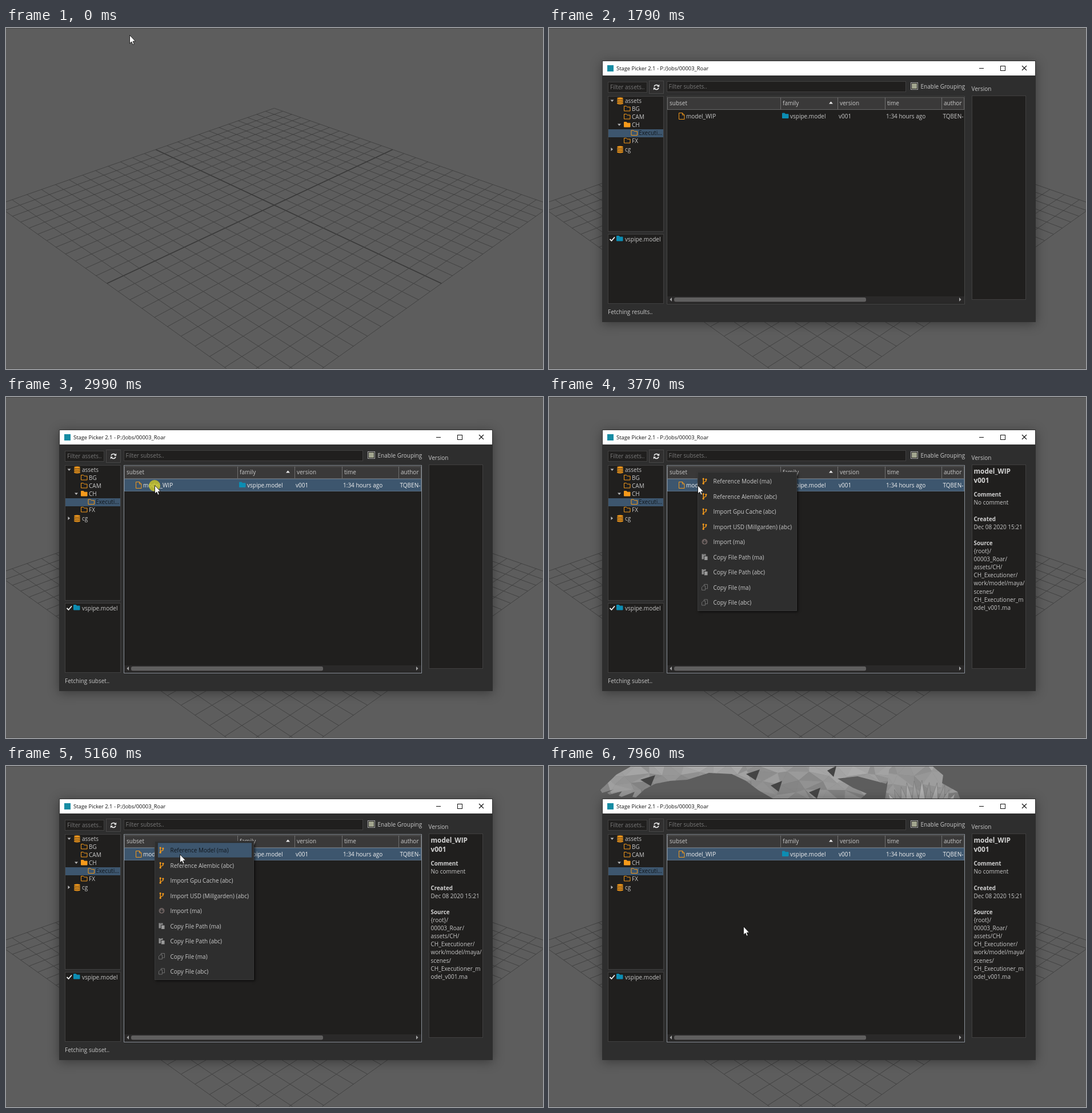
Recreate the animation shown at these times as an HTML page with a canvas. Size 940 px wide and 596 px high, loop 8 s.

```html
<!DOCTYPE html>
<html lang="en">
<head>
<meta charset="utf-8">
<title>Loading a model</title>
<style>
html, body { margin: 0; width: 100%; height: 100%; overflow: hidden; background: #5d5d5d; }
canvas { display: block; width: 940px; height: 596px; }
</style>
</head>
<body>
<canvas id="stage" width="940" height="596"></canvas>
<script>
const ctx = document.getElementById('stage').getContext('2d');
const LOOP = 8000;
const ORANGE = '#f59a1b', BLUE = '#0c8db3', SELECT = '#3d566e';
const TEXT = '#c8c8c8', DARK = '#201f1e', EDGE = '#403f3f', INK = '#10161c';

function rect(x, y, w, h, fill, stroke) {
  if (fill) { ctx.fillStyle = fill; ctx.fillRect(x, y, w, h); }
  if (stroke) {
    ctx.strokeStyle = stroke; ctx.lineWidth = 1;
    ctx.strokeRect(x + .5, y + .5, w - 1, h - 1);
  }
}

function path(points, fill, stroke, width = 1, closed = true) {
  ctx.beginPath();
  points.forEach(([x, y]) => ctx.lineTo(x, y));
  if (closed) ctx.closePath();
  if (fill) { ctx.fillStyle = fill; ctx.fill(); }
  if (stroke) { ctx.strokeStyle = stroke; ctx.lineWidth = width; ctx.stroke(); }
}

const line = (points, color, width = 1) => path(points, null, color, width, false);

function text(str, x, y, color = TEXT, size = 10, weight = 400) {
  ctx.font = `${weight} ${size}px "Open Sans", "Noto Sans", sans-serif`;
  ctx.fillStyle = color;
  ctx.fillText(str, x, y);
}

function disc(x, y, r, fill) {
  ctx.beginPath();
  ctx.arc(x, y, r, 0, Math.PI * 2);
  ctx.fillStyle = fill;
  ctx.fill();
}

function seeded(seed) {
  return () => (seed = (seed * 16807) % 2147483647) / 2147483647;
}

const grey = g => `rgb(${g | 0},${g | 0},${g | 0})`;

// Viewport

function project(u, v) {
  const s = u + v, w = 1 - .1709 * s;
  return [469.5 + 242.8 * (u - v) / w, 309.5 + 113.6 * s / w];
}

function drawGrid() {
  rect(0, 0, 940, 596, '#5d5d5d');
  for (let i = -12; i <= 12; i++) {
    const k = i / 12, color = i ? '#424242' : '#393939', width = i ? 1 : 1.5;
    line([project(k, -1), project(k, 1)], color, width);
    line([project(-1, k), project(1, k)], color, width);
  }
  rect(0, 0, 940, 1, '#484848');
  rect(0, 595, 940, 1, '#525252');
}

// Fills an outline with a jittered mesh of flat, softly lit triangles.
function facets(outline, seed, w, h) {
  const rnd = seeded(seed), cols = Math.ceil(680 / w), rows = Math.ceil(90 / h);
  const grid = [];
  for (let r = 0; r <= rows; r++) {
    grid.push([]);
    for (let c = 0; c <= cols; c++) {
      grid[r].push([70 + (c + rnd() * .8 - r * .4) * w, -10 + (r + rnd() * .7) * h]);
    }
  }
  ctx.save();
  path(outline);
  ctx.clip();
  for (let r = 0; r < rows; r++) for (let c = 0; c < cols; c++) {
    const a = grid[r][c], b = grid[r][c + 1], d = grid[r + 1][c], e = grid[r + 1][c + 1];
    for (const tri of [[a, b, e], [a, e, d]]) {
      const s = grey(158 - r * 6 + (rnd() - .5) * 30);
      path(tri, s, s, .6);
    }
  }
  ctx.restore();
}

function drawModel() {
  ctx.save();
  ctx.beginPath();
  ctx.rect(90, 1, 631, 57);
  ctx.clip();
  facets([[143, 1], [118, 15], [90, 42], [93, 47], [113, 41], [102, 47], [106, 50], [128, 44],
    [122, 52], [127, 54], [150, 45], [146, 54], [152, 55], [167, 41], [186, 31], [212, 26],
    [242, 24], [280, 12], [320, 14], [345, 26], [366, 42], [392, 57], [546, 57], [556, 48],
    [532, 38], [505, 22], [540, 18], [590, 31], [610, 1]], 71, 32, 17);
  facets([[596, 1], [672, 1], [690, 16], [688, 30], [715, 45], [720, 58], [588, 58], [592, 34]], 23, 26, 18);
  // Creases in shadow.
  for (const [x, y, w] of [[160, 24, 26], [345, 14, 24], [388, 34, 20], [455, 46, 20], [487, 8, 16]]) {
    path([[x, y], [x + w, y - 8], [x + w * .7, y + 11]], '#444');
  }
  const rnd = seeded(9);
  for (let i = 0; i < 15; i++) {
    const a = Math.PI * (1.03 + i * .067), len = 61 + rnd() * 9;
    const x = 653 + Math.cos(a) * len, y = 72 + Math.sin(a) * len * .72;
    const base = 653 + (x - 653) * .8;
    path([[x, y], [base + 7, 66], [base - 7, 66]], grey(145 + rnd() * 40), '#777', .7);
  }
  ctx.restore();
}

// Icons

function folder(x, y, color, solid) {
  path([[x, y], [x + 4, y], [x + 5.5, y + 1.7], [x + 10.5, y + 1.7], [x + 10.5, y + 8.5], [x, y + 8.5]],
    solid ? color : null, color);
}

function database(x, y) {
  for (let i = 0; i < 4; i++) {
    ctx.beginPath();
    ctx.ellipse(x + 5.5, y + 2 + i * 2.9, 5.3, 1.7, 0, 0, Math.PI * 2);
    ctx.fillStyle = ORANGE;
    ctx.fill();
    if (i) rect(x + .2, y + i * 2.9 + .6, 10.6, 1.3, ORANGE);
  }
  for (let i = 0; i < 3; i++) {
    ctx.beginPath();
    ctx.ellipse(x + 5.5, y + 2.6 + i * 2.9, 5.5, 1.7, 0, 0, Math.PI);
    ctx.strokeStyle = DARK;
    ctx.lineWidth = .8;
    ctx.stroke();
  }
}

function fileIcon(x, y) {
  path([[x, y], [x + 6, y], [x + 9.5, y + 3.5], [x + 9.5, y + 11], [x, y + 11]], null, ORANGE);
  line([[x + 6, y], [x + 6, y + 3.5], [x + 9.5, y + 3.5]], ORANGE);
}

function arrow(x, y, dir, color = '#bbb', r = 3) {
  const tips = { down: [[-r, -1.5], [r, -1.5], [0, 2]], up: [[-r, 2], [r, 2], [0, -2]],
    right: [[-1.5, -r], [2, 0], [-1.5, r]], left: [[1.5, -r], [-2, 0], [1.5, r]] };
  path(tips[dir].map(([a, b]) => [x + a, y + b]), color);
}

function refreshIcon(x, y) {
  ctx.strokeStyle = '#eee';
  ctx.lineWidth = 1.7;
  for (const a of [Math.PI * 1.08, Math.PI * .08]) {
    ctx.beginPath();
    ctx.arc(x, y, 4, a, a + Math.PI * .72);
    ctx.stroke();
  }
  path([[x + 5.2, y - 5], [x + 5.2, y - .8], [x + 1, y - .8]], '#eee');
  path([[x - 5.2, y + 5], [x - 5.2, y + .8], [x - 1, y + .8]], '#eee');
}

function forkIcon(x, y) {
  line([[x - 2.3, y - 4], [x - 2.3, y + 4.5]], ORANGE, 1.5);
  line([[x - 2.3, y + 2.5], [x + 2.4, y], [x + 2.4, y - 3]], ORANGE, 1.4);
  for (const [a, b] of [[-2.3, -4], [-2.3, 4.2], [2.4, -3]]) disc(x + a, y + b, 1.6, ORANGE);
}

function importIcon(x, y) {
  disc(x, y, 5, '#6c6160');
  line([[x, y - 3], [x, y + 2]], '#2e2e2e', 1.6);
  line([[x - 2.7, y], [x, y + 2.6], [x + 2.7, y]], '#2e2e2e', 1.5);
}

function pasteIcon(x, y) {
  rect(x - 5, y - 5, 7, 9, '#8c8c8c');
  rect(x - 3, y - 5, 3, 1, '#444');
  rect(x - 1.5, y - 2, 7, 8, '#2e2e2e');
  rect(x - .5, y - 1, 5.5, 6.5, '#999');
}

function copyIcon(x, y) {
  path([[x - 1, y - 5], [x + 5, y - 5], [x + 5, y + 2.5], [x - 1, y + 2.5]], null, '#6c6c6c');
  path([[x - 5, y], [x - 2.5, y - 2.5], [x + 1, y - 2.5], [x + 1, y + 5], [x - 5, y + 5]], '#2e2e2e', '#6c6c6c');
}

// Loader window

function drawTree() {
  rect(103, 119, 98, 237, DARK, EDGE);
  rect(104, 177, 96, 14, SELECT);
  arrow(110.5, 127, 'down');
  database(119, 121);
  text('assets', 133, 131);
  folder(131.5, 136.5, ORANGE);
  text('BG', 145, 145);
  folder(131.5, 150.5, ORANGE);
  text('CAM', 145, 159);
  arrow(123, 169, 'down');
  folder(131.5, 164.5, ORANGE, true);
  text('CH', 145, 173);
  folder(144, 179, ORANGE);
  text('Executi...', 157, 187, INK);
  folder(131.5, 192.5, ORANGE);
  text('FX', 145, 201);
  arrow(110, 212, 'right');
  database(119, 206);
  text('cg', 133, 216);

  rect(103, 360, 98, 122, DARK, EDGE);
  line([[106.5, 369], [109.5, 372], [115, 365.5]], '#f2f2f2', 1.8);
  folder(118.5, 363.5, BLUE, true);
  text('vspipe.model', 133, 372.5);
}

function drawTable(selected) {
  rect(206, 119, 522, 364, DARK, selected ? '#8b9199' : '#464646');
  if (selected) rect(207, 143, 520, 22, SELECT, '#5b7084');
  rect(207, 121, 520, 22, '#3a3939', '#666');
  for (const x of [405, 505, 588, 687]) rect(x, 121, 1, 21, '#707070');
  [['subset', 211], ['family', 409], ['version', 509], ['time', 592], ['author', 691]]
    .forEach(([s, x]) => text(s, x, 135));
  arrow(493.5, 130.5, 'up', '#eee', 3.5);

  const color = selected ? '#f0f0f0' : TEXT;
  fileIcon(227.5, 148.5);
  text('model_WIP', 240, 157.5, color);
  folder(408.5, 149, BLUE, true);
  text('vspipe.model', 422, 157.5, color);
  text('v001', 507, 157.5, color);
  text('1:34 hours ago', 590, 157.5, color);
  ctx.save();
  ctx.beginPath();
  ctx.rect(687, 143, 39, 22);
  ctx.clip();
  text('TQBEN-F', 689.5, 157.5, color);
  ctx.restore();

  rect(207, 469, 520, 12, '#2a2929');
  arrow(213.5, 474.5, 'left', '#a5a5a5', 3.5);
  arrow(719.5, 474.5, 'right', '#a5a5a5', 3.5);
  ctx.beginPath();
  ctx.roundRect(219, 471, 336, 7.5, 3);
  ctx.fillStyle = '#605f5f';
  ctx.fill();
}

function drawVersion() {
  text('model_WIP', 743.5, 134, '#d4d4d4', 11.8, 700);
  text('v001', 743.5, 150, '#d4d4d4', 11.8, 700);
  [['Comment', 174], ['Created', 216.5], ['Source', 259]]
    .forEach(([s, y]) => text(s, 743.5, y, '#d0d0d0', 9.8, 700));
  text('No comment', 743.5, 188);
  text('Dec 08 2020 15:21', 743.5, 230.5);
  ['{root}/', '00003_Roar/', 'assets/CH/', 'CH_Executioner/', 'work/model/maya/', 'scenes/',
    'CH_Executioner_m', 'odel_v001.ma'].forEach((s, i) => text(s, 743.5, 273 + i * 14.1));
}

function drawWindow(t) {
  ctx.save();
  ctx.shadowColor = 'rgba(0,0,0,.38)';
  ctx.shadowBlur = 18;
  ctx.shadowOffsetY = 3;
  rect(93, 57, 759, 457, '#2e2e2e');
  ctx.restore();
  rect(94, 58, 757, 25, '#fff');
  rect(102, 65, 11, 11, '#168ca3');
  text('Stage Picker 2.1 - P:/Jobs/00003_Roar', 118, 73.5, '#111', 9.4);
  rect(753, 70, 8, 1, '#111');
  rect(790, 66, 9, 9, null, '#111');
  line([[828, 66], [836, 74]], '#111', 1.1);
  line([[836, 66], [828, 74]], '#111', 1.1);

  rect(103, 94, 69, 19, DARK, EDGE);
  text('Filter assets..', 107, 107, '#787878');
  rect(175, 92, 26, 23, '#302f2f', '#484747');
  refreshIcon(188, 103.5);
  rect(206, 93, 419, 19, DARK, EDGE);
  text('Filter subsets..', 209.5, 106, '#787878');
  rect(633, 95, 13, 13, DARK, '#a8a8a8');
  rect(635, 97, 9, 9, '#a2a58f');
  text('Enable Grouping', 650.5, 105.5);
  text('Version', 739.5, 110);
  rect(740, 118, 95, 357, DARK, EDGE);

  drawTree();
  drawTable(t >= 2830);
  if (t >= 3060) drawVersion();
  if (t < 7960) text(t < 2990 ? 'Fetching results..' : 'Fetching subset..', 103, 500);
}

// Context menu

const MENU = [
  [forkIcon, 'Reference Model (ma)'], [forkIcon, 'Reference Alembic (abc)'],
  [forkIcon, 'Import Gpu Cache (abc)'], [forkIcon, 'Import USD (Millgarden) (abc)'],
  [importIcon, 'Import (ma)'], [pasteIcon, 'Copy File Path (ma)'],
  [pasteIcon, 'Copy File Path (abc)'], [copyIcon, 'Copy File (ma)'], [copyIcon, 'Copy File (abc)']
];

function drawMenu(alpha, [mx, my]) {
  ctx.save();
  ctx.globalAlpha = alpha;
  ctx.save();
  ctx.shadowColor = 'rgba(0,0,0,.6)';
  ctx.shadowBlur = 4;
  ctx.shadowOffsetX = ctx.shadowOffsetY = 2;
  rect(260, 131, 174, 243, '#2e2e2e');
  ctx.restore();
  rect(260, 131, 174, 243, null, '#393939');
  const hover = mx >= 266 ? Math.floor((my - 134) / 26.5) : -1;
  MENU.forEach(([icon, label], i) => {
    const y = 147 + i * 26.5;
    if (i === hover) rect(266, y - 12.6, 164, 25.4, SELECT);
    icon(272.5, y);
    text(label, 287.5, y + 4, i === hover ? INK : TEXT);
  });
  ctx.restore();
}

// Pointer

const KEYS = [
  [0, 216, 12], [1880, 225, 40], [2030, 235, 91], [2130, 235, 91], [2800, 260, 154],
  [4000, 260, 154], [4390, 300, 192], [4610, 300, 192], [5160, 304, 154],
  [6550, 304, 154], [7020, 378, 286], [7570, 378, 286], [7960, 340, 280], [LOOP, 340, 280]
];

function pointerAt(t) {
  const i = KEYS.findIndex(k => k[0] > t);
  const [t0, x0, y0] = KEYS[i - 1], [t1, x1, y1] = KEYS[i];
  const k = (t - t0) / (t1 - t0);
  return [Math.round(x0 + (x1 - x0) * k), Math.round(y0 + (y1 - y0) * k)];
}

function drawPointer([x, y]) {
  const shape = [[.5, .5], [.5, 15], [3.8, 12], [6, 17.2], [8.3, 16.2], [6.2, 11.2], [10.6, 11.2]];
  path(shape.map(([a, b]) => [x + a, y + b]), '#fff', '#111', .9);
}

function drawClick(t, down, up, gone, x, y, r) {
  if (t >= down && t < gone) disc(x, y, r, `rgba(205,200,38,${t < up ? .8 : .35})`);
}

function draw(t) {
  const pointer = pointerAt(t);
  drawGrid();
  if (t >= 730 && t < 1790) rect(152, 0, 183, 49, '#525252');
  if (t >= 7250) drawModel();
  if (t >= 1790) drawWindow(t);
  if (t >= 3770 && t < 6470) drawMenu(t < 6400 ? 1 : .5, pointer);
  drawClick(t, 2830, 3290, 3380, 260, 155, 10);
  drawClick(t, 6400, 6630, 6710, 304, 155, 8);
  if (t < 70 || t >= 1880) drawPointer(pointer);
}

const start = performance.now();
function tick() {
  draw((performance.now() - start) % LOOP);
  requestAnimationFrame(tick);
}
tick();
</script>
</body>
</html>
```
